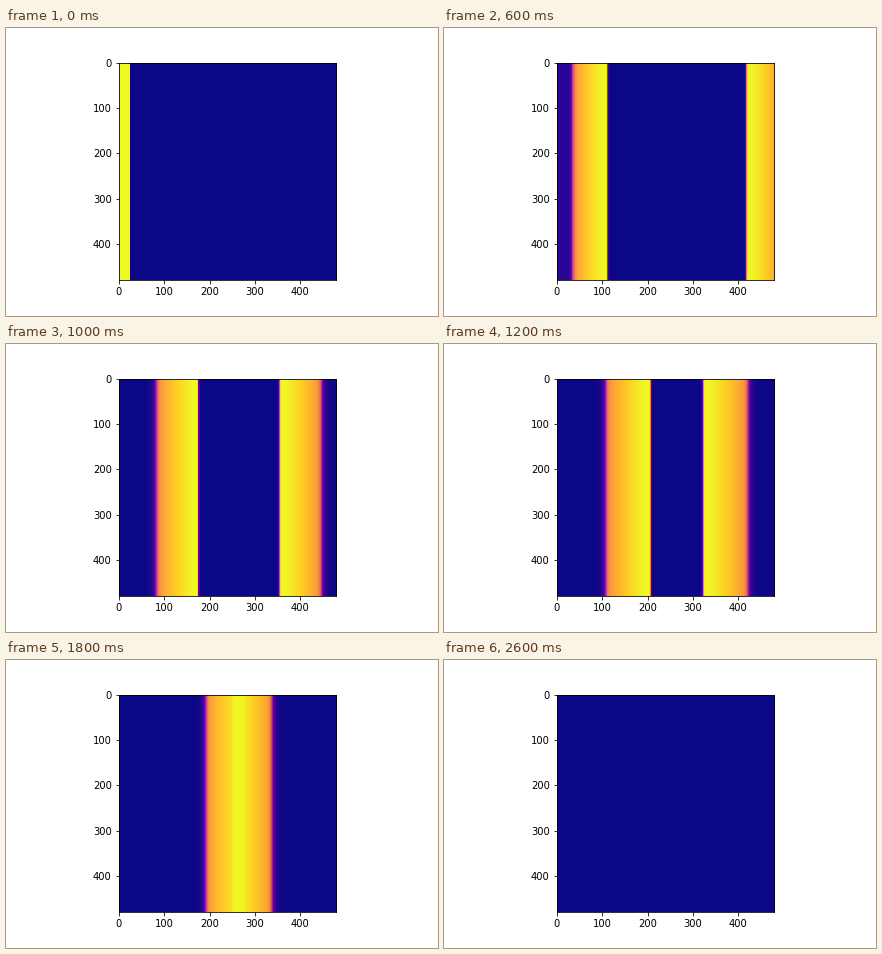
Animation of 432x288 px, one loop 4800 ms. Source, as a matplotlib script:

```python
import numpy as np
import matplotlib.pyplot as plt
from matplotlib.animation import FuncAnimation

SIZE = 480
FRAMES = 48
STIMULUS = 25          # width of the excited strip at the start
MEETING = 263.5        # where the two waves collide
LAST_ACTIVE = 25
SPEED, OFFSET = 15.85, 15.5

# Position of the recovering edge over time, measured from the left.
BACK_TIME = [0, 5.2, 8, 12, 18, 22, 23, 24, 25]
BACK_POS = [-34, 25, 57, 107.5, 191.5, 245.8, 250, 252, 252.5]

x = np.arange(SIZE)
# Fold the ring about the meeting point: both waves follow one rule.
path = np.minimum(x, 2 * MEETING - x)
start = np.where(path < STIMULUS, 0, np.maximum(0, (path - OFFSET) / SPEED))
origin = np.maximum(path, STIMULUS)
end = np.interp(origin, BACK_POS, BACK_TIME)


def sigmoid(z):
    return 1 / (1 + np.exp(-np.clip(z, -60, 60)))


def activation(n):
    if n == 0:
        return (x < STIMULUS).astype(float)
    if n > LAST_ACTIVE:
        return np.zeros(SIZE)
    front_pos = OFFSET + SPEED * n + 9.5 * np.exp(-2.3 * n)
    front = sigmoid((front_pos - path) / 0.9)
    age = np.clip((n - start) / (end - start), 0, 1)
    plateau = 1 - 0.28 * age ** 1.3
    z = origin - np.interp(n, BACK_TIME, BACK_POS)
    back = 0.72 * sigmoid(z / 2.3) + 0.28 * np.exp(np.minimum(z, 0) / 6)
    u = front * plateau * back
    return u / u.max()


def field(n):
    return np.tile(activation(n), (SIZE, 1))


plt.rcParams["font.family"] = "DejaVu Sans"
plt.rcParams["font.size"] = 10
fig = plt.figure(figsize=(6, 4), dpi=72, facecolor="white")
fig.subplots_adjust(left=0.125, right=0.9, bottom=0.125, top=0.88)
ax = fig.add_subplot()
image = ax.imshow(field(0), cmap="plasma", vmin=0, vmax=1, interpolation="nearest")
ax.set_xticks(range(0, SIZE, 100))
ax.set_yticks(range(0, SIZE, 100))


def update(n):
    image.set_data(field(n))
    return [image]


anim = FuncAnimation(fig, update, frames=FRAMES, interval=100,
                     repeat=True, repeat_delay=0, blit=False)
plt.show()
```
